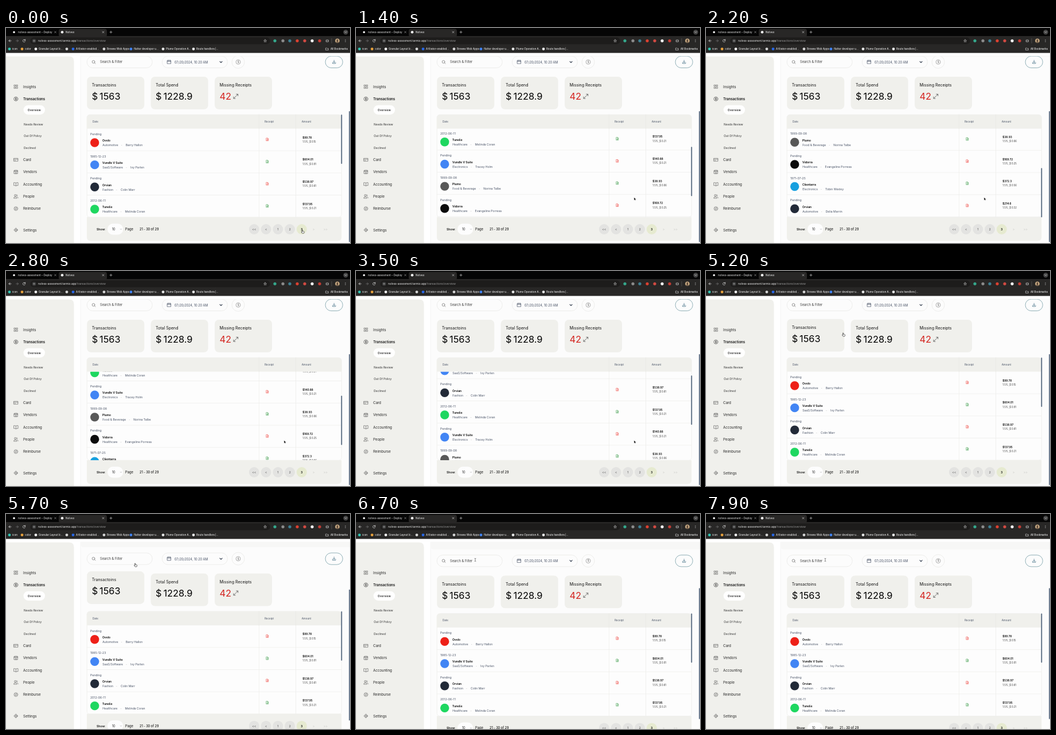
An HTML page for the animation above (8 s loop, 600x375 px).

```html
<!DOCTYPE html>
<html lang="en">
<head>
<meta charset="utf-8">
<title>Transactions overview</title>
<style>
html, body { margin: 0; width: 100%; height: 100%; overflow: hidden; background: #fff; }
svg { display: block; width: 100vw; height: 100vh; }
text { font-family: Inter, "Open Sans", sans-serif; white-space: pre; }
</style>
</head>
<body>
<svg id="stage" viewBox="0 0 600 375"></svg>
<script>
const LOOP = 8000, PITCH = 38.65, ROWS_TOP = 175.5;
const PANEL = '#f0f0ec', INK = '#111', MUTED = '#465064', LINE = '#e9e9e6', THUMB = '#4d6078';

const esc = s => String(s).replace(/&/g, '&amp;').replace(/</g, '&lt;');
const text = (x, y, s, size, fill = INK, weight = 400, anchor = 'start') =>
  `<text x="${x}" y="${y}" font-size="${size}" fill="${fill}" font-weight="${weight}" text-anchor="${anchor}">${esc(s)}</text>`;
const rect = (x, y, w, h, r, fill, stroke = 'none') =>
  `<rect x="${x}" y="${y}" width="${w}" height="${h}" rx="${r}" fill="${fill}" stroke="${stroke}" stroke-width=".6"/>`;
const dot = (x, y, r, fill, stroke = 'none') =>
  `<circle cx="${x}" cy="${y}" r="${r}" fill="${fill}" stroke="${stroke}" stroke-width=".6"/>`;
const path = (d, stroke, width = .7, x = 0, y = 0, fill = 'none') =>
  `<path transform="translate(${x} ${y})" d="${d}" fill="${fill}" stroke="${stroke}" stroke-width="${width}" stroke-linecap="round" stroke-linejoin="round"/>`;
const group = (id, body) => `<g id="${id}">${body}</g>`;

const CROSS = 'M-1.5-1.5 1.5 1.5M1.5-1.5-1.5 1.5';

function browser() {
  const pale = '#e8e8e8', dim = '#a3a3a3', bar = '#282726';
  const marks = [
    [6, 11, 'icon', '#2fc4b2'], [28, 33, 'color', '#e8a23d'], [52, 57, 'Granular Layout Ic…', '#f2f2f2'],
    [106, 0, '', '#d5d5d5'], [117, 122, 'A Krater-enabled…', '#2868e8'], [171, 176, 'Browse Web Apps', '#d5d5d5'],
    [218, 223, 'flutter developer u…', '#4285f4'], [274, 279, 'Plume Operation A…', '#e8e8e8'],
    [327, 332, 'Route handlers |…', '#e8e8e8']];
  const tools = [[469, '#35a78b'], [483, '#8b8b8b'], [495, '#3c7f92'], [508, '#dc4030'], [521, '#d04a42'], [534, '#f2f2f2'], [547, '#c43c34']];
  return rect(0, 0, 600, 15, 0, '#050505') + rect(0, 14, 600, 29.5, 0, bar) +
    rect(92, 1.5, 84, 14, 4, bar) +
    dot(14, 7.2, 1.7, '#fff') + text(21, 8.9, 'nolvex-assesment – Deploy', 4.6, pale) +
    path(CROSS, dim, .6, 86, 7.2) +
    dot(98, 7.2, 2.3, '#f4f4f4') + text(104, 8.9, 'Nolvex', 4.7, '#fff') +
    path(CROSS, pale, .6, 169.5, 7.2) + path('M-2 0H2M0-2V2', pale, .6, 183, 7.2) +
    dot(592.5, 7.2, 4.2, '#454545') + path('M-1.6-.8 0 .9 1.6-.8', pale, .7, 592.5, 7.2) +
    path('M2 0H-2M0-2-2 0 0 2', pale, .7, 7, 22.3) + path('M-2 0H2M0-2 2 0 0 2', '#777', .7, 19.5, 22.3) +
    path('M2-1A2.2 2.2 0 1 0 2.1.8M2.2-2.4V-.8H.6', pale, .7, 31.5, 22.3) +
    rect(42.5, 16.5, 418, 11.8, 5.9, '#1d1c1b') + dot(49, 22.4, 3.6, '#333') +
    path('M-1.6-.9H1.6M-1.6.9H1.6', pale, .5, 49, 22.4) +
    `<text x="56" y="24" font-size="4.75" fill="#f2f2f2">nolvex-assesment.tarmio.app<tspan fill="#9a9a9a">/transactions/overview</tspan></text>` +
    path('M0-2.4.7-.8 2.4-.7 1.1.4 1.5 2.1 0 1.2-1.5 2.1-1.1.4-2.4-.7-.7-.8Z', pale, .5, 452, 22.4) +
    tools.map(([x, c]) => dot(x, 22.3, 2.6, c)).join('') +
    path('M-1.8-1H1.8V2H-1.8Z', pale, .7, 560.5, 22) + path('M0-4V4', '#777', .5, 568, 22.3) +
    dot(578, 22.3, 3.8, '#c9ab84') + dot(578, 21.5, 1.4, '#4b382c') + path('M-2 2.6Q0-.8 2 2.6Z', '#4b382c', .4, 578, 22.3, '#4b382c') +
    [-1.8, 0, 1.8].map(d => dot(592, 22.3 + d, .5, pale)).join('') +
    marks.map(([x, tx, s, c]) => dot(x, 36.6, 2.4, c) + text(tx, 38.3, s, 4.45, pale, 500)).join('') +
    path('M-2.2-1.6H-.4L.3-.9H2.3V1.8H-2.2Z', pale, .6, 560, 36.6) + text(566, 38.3, 'All Bookmarks', 4.4, pale, 500);
}

function sidebar() {
  const items = [
    ['Insights', 102.3, 'M-3-3H-.7V-.7H-3ZM.8-3H3V-1H.8ZM-3 1H-.7V3H-3ZM.8.5H3V3H.8Z'],
    ['Transactions', 123.7, 'M3.5 0A3.5 3.5 0 1 1-3.5 0A3.5 3.5 0 1 1 3.5 0M1-1Q0-1.8-.9-1-.8 0 0 0 .9.1 1 1 0 1.8-1 1M0-2.2V2.2'],
    ['Card', 229.8, 'M-3.5-2.5H3.5V2.5H-3.5ZM-3.5-.8H3.5M-2.2 1.2H-.8'],
    ['Vendors', 251, 'M-3-1.5H3V3H-3ZM-3.3-1.5-2.7-3H2.7L3.3-1.5ZM-1 3V.8H1V3'],
    ['Accounting', 272.3, 'M0-2Q-1.5-3-3.7-2.6V2.4Q-1.5 2 0 3 1.5 2 3.7 2.4V-2.6Q1.5-3 0-2V3'],
    ['People', 293.6, 'M.5-1.6A1.6 1.6 0 1 1-2.7-1.6A1.6 1.6 0 1 1 .5-1.6M-3.8 3Q-3.6.8-1.1.8T1.7 3ZM1.4-3Q3-2.6 2.4-.8L1.6-.2M2.4.9Q3.8 1.4 3.8 3'],
    ['Reimburse', 315, 'M3.3 0A3.3 3.3 0 1 1-3.3 0A3.3 3.3 0 1 1 3.3 0M-1.5-1H1.5L.7-1.8M1.5 1H-1.5L-.7 1.8'],
    ['Settings', 352.3, 'M2.6 0A2.6 2.6 0 1 1-2.6 0A2.6 2.6 0 1 1 2.6 0M1 0A1 1 0 1 1-1 0A1 1 0 1 1 1 0M0-3.4V-2.6M0 2.6V3.4M-3.4 0H-2.6M2.6 0H3.4']];
  const subs = [['Needs Review', 167.7], ['Out Of Policy', 188.2], ['Declined', 208.9]];
  return path('M0 49.5H110Q118.5 49.5 118.5 58V375H0Z', 'none', 0, 0, 0, PANEL) +
    items.map(([s, y, d], i) => path(d, i === 1 ? '#222' : '#555', .6, 17.3, y) +
      text(30, y + 2.2, s, 6.1, i === 1 ? '#111' : '#222', i === 1 ? 600 : 400)).join('') +
    rect(30.5, 134.7, 37.5, 16.2, 8.1, '#fff') + text(49.2, 144.5, 'Overview', 5, '#111', 500, 'middle') +
    subs.map(([s, y]) => text(31, y + 1.9, s, 5, '#2c2c2c')).join('');
}

function toolbar() {
  const edge = '#e3e3e0';
  return rect(141.2, 49.2, 114, 20.3, 10.1, '#fcfcfc', edge) +
    path('M2 0A2.4 2.4 0 1 1-2.8 0A2.4 2.4 0 1 1 2 0M1.4 1.7 3 3.2', '#555', .6, 153, 59) +
    text(164, 61.3, 'Search & Filter', 5.7, '#3c3c3c') +
    rect(272.3, 49.2, 114, 20.3, 10.1, '#fcfcfc', edge) +
    path('M-3-2.5H3V3H-3ZM-3-.8H3M-1.5-3.4V-2M1.5-3.4V-2', MUTED, .7, 284.5, 59.2) +
    text(294, 61.9, '07/20/2024, 10:20 AM', 5.5, MUTED) +
    path('M-2-1 0 1.1 2-1', '#2f3a4c', 1.1, 375, 59.3) +
    dot(405, 59.3, 11, '#fcfcfc', edge) + dot(405, 59.3, 3.9, 'none', '#777') + text(405, 61.1, '$', 5, '#666', 400, 'middle') +
    rect(557, 49.2, 30.3, 20.3, 10.1, '#fcfcfc', '#4b7f8a') +
    path('M0-3V1M-1.5-.4 0 1.1 1.5-.4M-2.7 1V2.7H2.7V1', '#33647c', .7, 572.2, 59.2);
}

function card(x, label, value, fill = '#000') {
  return rect(x, 85, 100, 56.8, 7, PANEL) + text(x + 8.5, 102.2, label, 7) +
    text(x + 8.5, 125.2, value, 16.3, fill);
}

const rows = [
  ['Ovelo', 'Automotive', 'Barry Hallon', 'Pending', 99.78, '0.15', '#ee2018'],
  ['Vundle V Suite', 'SaaS/Software', 'Ivy Parlen', '1985-12-23', 604.01, '0.91', '#4285f4'],
  ['Orvian', 'Fashion', 'Colin Marr', 'Pending', 538.97, '0.81', '#222a38'],
  ['Tunelix', 'Healthcare', 'Melinda Coran', '2012-06-11', 137.95, '0.21', '#1ed760'],
  ['Vundle V Suite', 'Electronics', 'Tracey Holm', 'Pending', 140.88, '0.21', '#4285f4'],
  ['Plumo', 'Food & Beverage', 'Norina Talbe', '1999-09-08', 38.93, '0.06', '#585858'],
  ['Vidorra', 'Healthcare', 'Evangeline Porresa', 'Pending', 169.72, '0.25', '#0c0c0c'],
  ['Clientarra', 'Electronics', 'Tobin Wexley', '1971-07-25', 372.3, '0.56', '#18a0df'],
  ['Orvian', 'Automotive', 'Delia Marrin', 'Pending', 214.6, '0.32', '#222a38']];

function row([name, kind, person, date, amount, fee, color], i) {
  const y = ROWS_TOP + i * PITCH, mark = date === 'Pending' ? '#ee4b45' : '#3f9d4c';
  return text(147, y + 11.5, date, 5.1, MUTED) + dot(154.7, y + 24.5, 7.7, color) +
    text(168, y + 22.8, name, 5, '#000', 600) +
    `<text x="168.3" y="${y + 30.8}" font-size="5.1" fill="${MUTED}">${esc(kind)}<tspan dx="5" fill="#c4c4c4" font-size="3.6">•</tspan><tspan dx="6">${person}</tspan></text>` +
    path('M-1.7-2.3H.5L1.8-1V2.4H-1.7ZM.4-2.2V-.9H1.7M-.7.3H.8M-.7 1.3H.8', mark, .6, 455.8, y + 18.8) +
    text(517.3, y + 17.2, '$' + amount, 4.7, '#000', 600) + text(517.3, y + 24.4, `1.5% ,$ ${fee}`, 4.2, '#333') +
    path(`M141.5 ${y + PITCH}H585`, LINE, .6);
}

function table() {
  return rect(141.2, 151.2, 444, 179, 5, '#fdfdfd', LINE) +
    `<g clip-path="url(#rowClip)">${group('rows', rows.map(row).join(''))}</g>` +
    path('M441.3 175.5V330M505.5 175.5V330', LINE, .6) +
    path('M141 175.5V157Q141 151 147 151H579Q585.3 151 585.3 157V175.5Z', 'none', 0, 0, 0, PANEL) +
    path('M441.3 151V175.5M505.5 151V175.5', '#e6e6e1', .6) +
    text(151, 165, 'Date', 4.5, MUTED) + text(451, 165, 'Receipt', 4.5, MUTED) + text(515.7, 165, 'Amount', 4.5, MUTED) +
    group('thumb', rect(584.5, 151, 1.7, 86, .8, THUMB));
}

function pager() {
  const labels = ['<<', '<', '1', '2', '3', '>', '>>'];
  return path('M141 330H585.3V364.5Q585.3 371.5 578.3 371.5H148Q141 371.5 141 364.5Z', 'none', 0, 0, 0, PANEL) +
    text(158, 352.8, 'Show:', 5.2, '#111', 600) + rect(177, 341.2, 27.3, 19.3, 9.6, '#fdfdfd') +
    text(184.7, 352.9, '10', 5.6, '#333') + path('M-1.2-.6 0 .6 1.2-.6', '#888', .5, 200.5, 351) +
    text(208, 353, 'Page', 5.8) + text(233, 352.9, '21 - 30 of 29', 5.5, INK, 500) +
    labels.map((s, i) => {
      const x = 432.8 + i * 20.75;
      return (i < 5 ? dot(x, 351, 9, i === 4 ? '#e6ead0' : '#e3e3e1') : '') +
        text(x, 352.9, s, 5.4, i > 4 ? '#c6c6c3' : i === 4 ? '#111' : '#555', i === 4 ? 600 : 400, 'middle');
    }).join('');
}

const pointers =
  group('arrow', path('M-1.6-2.4V2.4L-.4 1.4.4 3 1.3 2.6.6 1.1H2Z', '#fff', .5, 0, 0, '#000')) +
  group('hand', path('M-1.1-3Q-.4-3.4-.2-2.6V-.8L1.8-.4Q2.8-.1 2.6 1L2 3H-.9L-2.5.7Q-2.4-.2-1.5.3L-1.1.6Z', '#111', .6, 0, 0, '#fff')) +
  group('beam', path('M-1-2.6Q0-2.6 0-2V2Q0 2.6-1 2.6M1-2.6Q0-2.6 0-2M0 2Q0 2.6 1 2.6', '#222', .5));

const stage = document.getElementById('stage');
stage.innerHTML =
  `<defs><clipPath id="pageClip"><rect x="119" y="49.2" width="481" height="326"/></clipPath>
   <clipPath id="rowClip"><rect x="141" y="175.5" width="444.5" height="154.5"/></clipPath></defs>` +
  rect(0, 0, 600, 375, 0, '#fff') + rect(130, 49.2, 470, 326, 0, '#fcfcfc') +
  path('M130 375V49.2H600', '#eeeeec', .6) + sidebar() +
  `<g clip-path="url(#pageClip)">` + group('page',
    rect(130, 10, 480, 29.3, 5, '#f7f7f6') + toolbar() +
    group('lifted', card(141.2, 'Transactoins', '$\u20091563')) + card(252.6, 'Total Spend', '$\u20091228.9') +
    card(364, 'Missing Receipts', '42', '#d3241f') +
    path('M-3.7 3.7 3.7-3.7M.8-3.8H3.8V-.8M-3.8.8V3.8H-.8', '#555', .8, 400.8, 119.2) +
    table() + pager()) + '</g>' +
  group('pageThumb', rect(598.2, 145, 1.6, 228.5, .8, THUMB)) +
  browser() + group('pointer', pointers);

const $ = id => document.getElementById(id);
const move = (id, x, y) => $(id).setAttribute('transform', `translate(${x} ${y})`);

// Linear interpolation through [time, value] pairs.
function track(t, keys) {
  const i = keys.findIndex(k => k[0] > t);
  if (i < 0) return keys[keys.length - 1][1];
  if (i === 0) return keys[0][1];
  const [t0, a] = keys[i - 1], [t1, b] = keys[i];
  return a + (b - a) * (t - t0) / (t1 - t0);
}

const tableScroll = [[700, 0], [1400, 117], [1900, 194], [2400, 194], [2800, 138.5], [3500, 65], [4100, 0]];
const pageShift = [[5300, 0], [5700, 18.7], [6500, 22.4]];
const cardLift = [[5150, 0], [5400, 6], [5580, 6], [5700, 3.6], [5900, 0]];
const pointerX = [[100, 517.5], [700, 486.5], [3900, 486.5], [4600, 336.5], [5200, 240], [5700, 226], [6500, 208]];
const pointerY = [[100, 355], [700, 298], [3900, 298], [4600, 147.3], [5200, 111], [5700, 89], [6500, 80]];

function draw(t) {
  const scroll = track(t, tableScroll), shift = track(t, pageShift);
  move('rows', 0, -scroll);
  move('thumb', 0, scroll * .481);
  move('page', 0, shift);
  move('pageThumb', 0, -shift * .705);
  move('lifted', 0, -track(t, cardLift));
  move('pointer', track(t, pointerX), track(t, pointerY));
  const kind = t < 200 || (t >= 5200 && t < 5800) ? 'hand' : t >= 5800 ? 'beam' : 'arrow';
  for (const id of ['arrow', 'hand', 'beam']) $(id).style.display = id === kind ? '' : 'none';
}

const start = performance.now();
function tick() {
  draw((performance.now() - start) % LOOP);
  requestAnimationFrame(tick);
}
tick();
</script>
</body>
</html>
```
